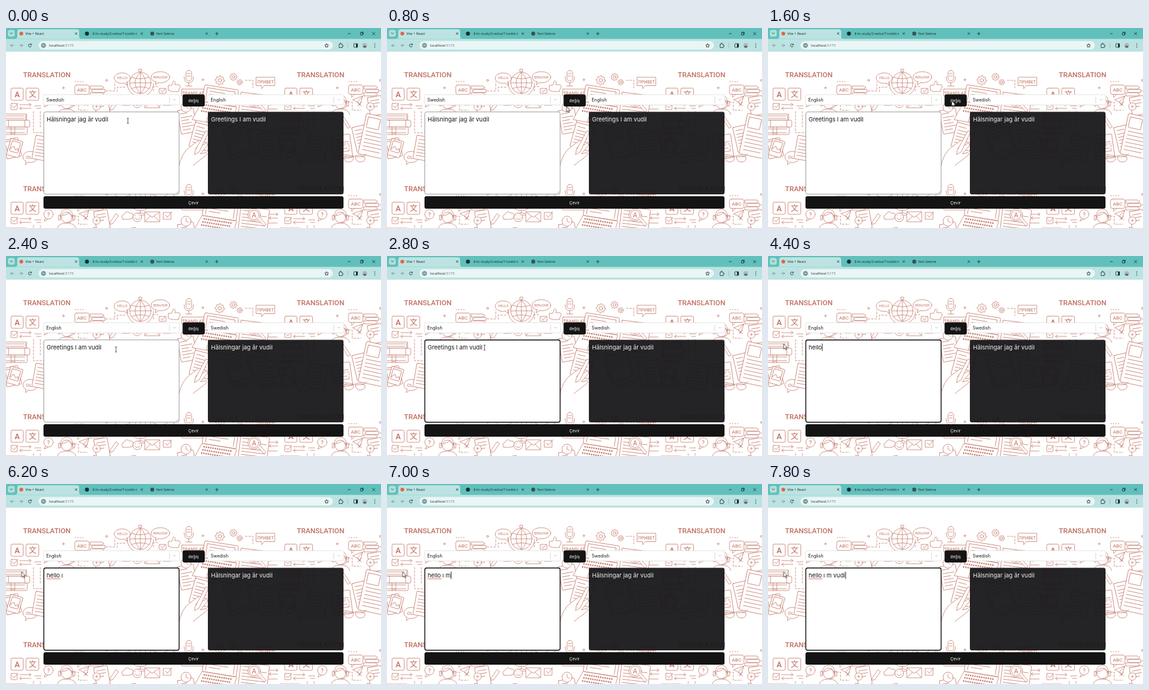
An HTML page that plays this animation: 600 by 321 pixels, repeating every 8000 ms.

```html
<!DOCTYPE html>
<html lang="en">
<head>
<meta charset="utf-8">
<title>Translator</title>
<style>
  html, body { margin: 0; width: 100%; height: 100%; overflow: hidden; background: #fff; }
  svg { display: block; width: 100vw; height: 100vh; }
  text { white-space: pre; }
  .bar { font: 5.5px "Open Sans", sans-serif; fill: #142a2a; }
  .ui { font-family: Inter, sans-serif; font-size: 7.1px; fill: #161616; }
  .ui.big { font-size: 9.4px; }
  .ui.light { fill: #f2f2f2; }
  .line { fill: none; stroke: #1f3837; stroke-width: .85; }
  .art { fill: #fff; stroke: #c67e6f; stroke-width: .8; stroke-linejoin: round; stroke-linecap: round; }
  .art text { font-family: Roboto, "Noto Sans CJK SC", "Noto Sans CJK", sans-serif; fill: #c06f60; stroke: none; text-anchor: middle; }
  .art .open { fill: none; }
  .art .dash { fill: none; stroke-dasharray: 3 2.5; }
  .art .keys { fill: none; stroke-width: 2.4; stroke-dasharray: 2.2 1.4; stroke-linecap: butt; }
</style>
</head>
<body>
<svg viewBox="0 0 600 321" preserveAspectRatio="none">
  <defs>
    <clipPath id="cell"><rect y="38" width="438" height="183"/></clipPath>
    <g id="tile" class="art" clip-path="url(#cell)"></g>
  </defs>
  <rect width="600" height="321" fill="#fff"/>
  <use href="#tile"/>
  <use href="#tile" x="438"/>
  <use href="#tile" y="183"/>
  <use href="#tile" x="438" y="183"/>

  <g id="browser">
    <rect width="600" height="20" fill="#61c0bc"/>
    <rect y="17.5" width="600" height="20.5" fill="#bce3e2"/>
    <path d="M14 17.500q4 0 4-4V6q0-4 4-4h91q4 0 4 4v7.500q0 4 4 4z" fill="#bce3e2"/>
    <rect x="3" y="3" width="11" height="11" rx="3.500" fill="#b0deDB"/>
    <path class="line" d="M6.500 7.500l2 2 2-2"/>
    <circle cx="24.500" cy="9" r="3" fill="#e0663f"/>
    <circle cx="129.500" cy="9" r="3.200" fill="#17302f"/>
    <circle cx="234" cy="9" r="3.200" fill="#3a5453"/>
    <g class="bar">
      <text x="31" y="11">Vite + React</text>
      <text x="138.500" y="11" font-size="5.200" style="font-size:5.2px">8-hc-study/2-redux/7-toolkit-t</text>
      <text x="240" y="11">Yeni Sekme</text>
    </g>
    <path class="line" d="M110.500 7.200l3.500 3.500m0-3.500l-3.500 3.500M215.500 7.200l3.500 3.500m0-3.500l-3.500 3.500M319.500 7.200l3.500 3.500m0-3.500l-3.500 3.500M334.500 9h5.500m-2.750-2.750v5.500M547 9h4.500M586 6.800l4.500 4.500m0-4.500l-4.500 4.500M567 7.800h3.500v3.500h-3.500zM568 7.800v-1.200h3.700v3.700h-1.200"/>
    <rect x="52" y="21" width="471" height="13.500" rx="6.750" fill="#eaf6f5"/>
    <circle cx="60" cy="28" r="5" fill="#c9e4e2"/>
    <path class="line" d="M40.500 27a2.400 2.400 0 1 0 0 2m.2-3.800v1.900h-1.900M60 27.500v2m0-4v1"/>
    <circle class="line" cx="60" cy="28" r="2.800"/>
    <path class="line" opacity=".5" d="M12.500 28h-5m2.300-2.300L7.500 28l2.300 2.300M21.500 28h5m-2.300-2.300l2.300 2.300-2.300 2.300"/>
    <text class="bar" x="69" y="30" style="font-size:5.8px">localhost<tspan fill="#5f6f6e">:5173</tspan></text>
    <path class="line" d="M513 25l.9 2 2.200.2-1.600 1.500.4 2.200-1.900-1.100-1.900 1.100.4-2.200-1.600-1.500 2.200-.2zM533 26h1.500q-.3-2 .8-2t.8 2h1.900v1.800q1.600 0 1.600 1t-1.600 1V31.500h-5z"/>
    <path d="M547 24v8" stroke="#86bdb9" stroke-width=".7"/>
    <rect class="line" x="556.500" y="25.200" width="6" height="5.800" rx=".8"/>
    <path d="M560 25.200h2.500V31H560z" fill="#142a2a"/>
    <circle cx="574" cy="28" r="3.700" fill="#a9b6c2"/>
    <path d="M571 30q3-3 6 0q-3 3-6 0z" fill="#5b565c"/>
    <path d="M590 25.300v.1m0 2.600v.1m0 2.600v.1" stroke="#142a2a" stroke-width="1.300" stroke-linecap="round"/>
  </g>

  <g id="selects"></g>
  <g fill="#141415">
    <rect x="282.500" y="106.500" width="35.500" height="19.500" rx="3"/>
    <rect x="60" y="270" width="480" height="20" rx="3"/>
  </g>
  <text class="ui light" x="300" y="118.500" text-anchor="middle" style="font-size:6.7px">değiş</text>
  <text class="ui light" x="300" y="282.800" text-anchor="middle" style="font-size:6.7px">Çevir</text>

  <rect id="field" x="60.500" y="134.700" width="216.500" height="132" rx="3" fill="#fff"/>
  <path id="grip" d="M276 261.500l-4 4m4-2l-2 2" stroke="#888" stroke-width=".6"/>
  <rect x="323" y="134.500" width="217" height="132.500" rx="3" fill="#19181a" opacity=".95"/>
  <rect id="mark" y="140" height="13" fill="#2f62cf"/>
  <text id="input" class="ui big" x="65" y="149.500"></text>
  <text id="output" class="ui big light" x="328" y="149.500"></text>
  <path id="squiggle" fill="none" stroke="#e0473f" stroke-width=".7"/>
  <rect id="caret" y="140.500" width=".9" height="12" fill="#111"/>
  <path id="arrow" d="M0 0v8.500l2-1.800 1.500 3.200 1.300-.6-1.500-3.100h2.700z" fill="#fff" stroke="#222" stroke-width=".7"/>
  <path id="beam" d="M-1.500-4H1.500M0-4V4M-1.500 4H1.500" fill="none" stroke="#333" stroke-width=".8"/>
</svg>
<script>
const $ = id => document.getElementById(id);

// Background illustration helpers
const path = (d, cls = 'open') => `<path class="${cls}" d="${d}"/>`;
const word = (x, y, size, s, weight = 400) =>
  `<text x="${x}" y="${y}" font-size="${size}" font-weight="${weight}">${s}</text>`;
const box = (x, y, w, h, r = 2) => `<rect x="${x}" y="${y}" width="${w}" height="${h}" rx="${r}"/>`;
const disc = (x, y, r, extra = '') => `<circle cx="${x}" cy="${y}" r="${r}" ${extra}/>`;
const tilt = (x, y, angle, art) => `<g transform="translate(${x} ${y}) rotate(${angle})">${art}</g>`;
const bubble = (x, y, rx, ry, s, size, side = 1) =>
  `<ellipse cx="${x}" cy="${y}" rx="${rx}" ry="${ry}"/>` +
  path(`M${x + 3 * side} ${y + ry - .6}l${5 * side} 4 ${-side}-6`, '') + word(x, y + size * .36, size, s);
const sheet = (x, y, w, h, angle, gap = 5) => {
  let rows = '';
  for (let v = 12; v < h - 4; v += gap) rows += `M4 ${v}h${w - 8 - (v % 3) * 3}`;
  return tilt(x, y, angle, box(0, 0, w, h, 1) + path(`M4 6h${w * .4}` + rows));
};
const gear = (x, y, r) => {
  const rim = Array.from({ length: 32 }, (_, i) => {
    const a = i * Math.PI / 16, d = i % 4 < 2 ? r : r * .76;
    return `${(x + d * Math.cos(a)).toFixed(1)} ${(y + d * Math.sin(a)).toFixed(1)}`;
  });
  return path(`M${rim.join('L')}z`, '') + disc(x, y, r * .38);
};
const swap = (x, y, w) => path(`M${x} ${y}h${w}m-3-2.500l3 2.500-3 2.500M${x + w} ${y + 6}h${-w}m3-2.500l-3 2.500 3 2.500`);
const plus = (x, y) => path(`M${x - 2} ${y}h4m-2-2v4`);
const dots = (x, y) => `<path d="M${x} ${y}h13" stroke-width="1.6" stroke-dasharray="0 4"/>`;

$('tile').innerHTML = [
  word(65.300, 78.6, 11.4, 'TRANSLATION', 500),
  box(8, 96.500, 19.5, 19.5), word(18, 110.500, 12.5, 'A', 500),
  box(32, 96.500, 20.5, 19.5), word(42.500, 110.700, 12.5, '文'),
  box(8, 121, 10, 10, 1), path('M10 125l3 3 6-7'),
  swap(22, 123, 18), path('M46 125h10m-7 4h7'), path('M44 134v34h18M55 134v26', 'dash'),
  // phrase cards
  dots(111, 86), dots(331, 100),
  box(110, 91.500, 23, 15, 3), path('M115 106.500v5l5-5'), word(121.500, 102, 8, 'ABC'),
  path('M135 93h18l4 2.500-4 2.500h-18zM158 98.500h-18l-4 2.500 4 2.500h18zM135 104h18l4 2.500-4 2.500h-18z', ''),
  path('M160 101h14v-14', 'dash'), disc(161, 84, 1.500), plus(92, 96), plus(315, 83),
  // globe
  disc(215, 89, 21, 'class="open" stroke-dasharray="72 60"'),
  disc(215, 88, 17),
  path('M215 71v34M198 88h34M201 79q14 5 28 0M201 97q14-5 28 0M215 71q-17 17 0 34M215 71q17 17 0 34M213 66h4v4h-4zM215 110v4M205 117q10-7 20 0z'),
  bubble(186, 80.500, 13, 8.5, 'HELLO', 5.4), bubble(247, 79, 15, 9, 'BONJOUR', 5, -1),
  path('M260 92h5l3-7q4 0 2 6h7q3 2 1 5t-2 6h-11l-5-2z', ''),
  box(245, 97, 11, 8, 1), path('M248 100l2 3 5-6'),
  path('M178 102v-7h15M236 101v-7h8', 'dash'),
  // microphone
  '<rect x="288" y="68" width="9" height="17" rx="4.500"/>',
  path('M285 78q0 10 7.500 10t7.500-10M292.500 88v5m-5 0h10M290 73h5m-5 4h5'),
  box(281, 98, 41, 11, 1), word(301.500, 106.700, 7.2, 'TRANSLATE'),
  gear(342, 84, 7.500), gear(364, 78.500, 5.800), gear(374, 87, 4.500),
  path('M383 84h12v12', 'dash'),
  path('M400.500 79h29.500v13.500h-17l-4 5v-5h-8.500z', ''), word(415.300, 88.500, 6.9, 'ПРИВЕТ'),
  // desk rows
  disc(68, 116, 7.500), path('M63 122l-2 5 6-3'), word(68, 119.500, 9, '?'),
  path('M82 139q2-9 15-9t15 9', ''), disc(97, 121, 8.500), path('M87 121q0-13 10-13t10 13M87 118v7h-3v-7zM107 118v7h3v-7zM107 125q-2 5-9 4M90 118q8-1 10-5q2 4 6 5'),
  path('M117 115l16-6-5 15-4-5zM124 119l9-10', ''),
  tilt(140, 112, -10, box(0, 0, 22, 30, 1) + path('M4 6h14M4 11h14M4 16h10')),
  path('M167 128l9-13 4 3-9 13-5 1zM187 124q-4-6 2-8q3-7 9-2q7-1 5 7q0 4-16 3z', ''),
  disc(210, 121, 7), path('M206 122q4 5 8 0M207 118v.5m6-.5v.5'),
  box(222, 112, 24, 16, 1), path('M222 112l12 9 12-9M222 128l9-9m15 9l-9-9'),
  path('M252 113h12v11h-12zM255 117l3 4 7-9', ''),
  // laptop, papers, hand and pen
  sheet(376, 103, 46, 56, 7), sheet(274, 133, 26, 38, -10),
  tilt(318, 91, 9, box(0, 0, 55, 27) + path('M5 4h45v20M5 4v20M10 9h24m-24 5h30m-30 5h18')),
  path('M314 118l55 9-9 32-62-12z', ''),
  path('M316 123l46 7.500M314 128l46 7.500M312 133l46 7.500', 'keys'),
  path('M323 143l17 3-2 7-17-3z', ''),
  disc(288, 127, 8), path('M288 122v5l4 2'),
  sheet(303, 151, 31, 40, 15),
  path('M276 224q5-24 18-33l15-11q4 0 2 5l-8 9 17-9q4 1 2 4l-11 13 9-2q3 3-2 6l-18 14-4 8z', ''),
  path('M303 196l17-31 4 2-15 32-7 4z', ''),
  disc(397, 117, 10), disc(397, 117, 7.500), word(397, 121, 10.5, 'A'), path('M403 124l10 11 3-3-10-11', ''),
  swap(421, 116, 14), path('M420 130h14'),
  tilt(346, 163, -17, box(0, 0, 40, 50, 3) + box(4, 5, 32, 38, 1) + path('M8 11h22m-22 6h18m-18 6h22')),
  sheet(401, 171, 33, 42, -9),
  path('M375 207l28-12 2 4-29 12-4-1z', ''),
  // books, photos
  box(-4, 138, 37, 10), box(-4, 148, 42, 11), box(-4, 159, 38, 12),
  path('M0 141h29M0 145h29M4 148v11m26-11v11M0 162h30M0 168h30M8 159v12l3-3 3 3v-12M33 138q-4 5 0 10'),
  tilt(-5, 181, -13, box(0, 0, 24, 30, 1) + box(3, 3, 18, 19, 1)),
  tilt(8, 177, 16, box(0, 0, 20, 27, 1) + box(3, 3, 14, 17, 1) + path('M3 17l5-6 4 5 3-3 2 4')),
  bubble(39, 207, 12, 9, 'OLA', 7.3, -1),
  sheet(48, 172, 30, 38, 10), sheet(82, 174, 30, 38, -8),
  // right-hand desk
  path('M104 119h12v13h14', 'dash'), path('M125 119l6 6m0-6l-6 6'), disc(145, 126, 6), plus(145, 126),
  sheet(115, 160, 28, 41, -13),
  tilt(139, 137, 12, box(0, 0, 54, 66, 2) + box(4, 5, 20, 17, 1) + path('M28 7h20m-20 5h22m-22 5h18M5 28h44M5 34h40M5 40h44M5 46h37M5 52h44M5 58h28')),
  path('M103 207q3-4 8-3l8 2q8-4 14 0l6-4M103 207q0 9 8 8t7-8zM121 207q1 9 9 8t6-8z'),
  path('M102 142l11 17-4 2-10-17z', ''), path('M102 186h9v10', 'dash'),
  sheet(166, 143, 42, 51, -8), sheet(220, 147, 38, 52, 7)
].join('');

const dropdown = (x, id) =>
  `<rect x="${x}" y="107" width="217.500" height="16.500" rx="2" fill="#fff" stroke="#d8d8d8" stroke-width=".7"/>
   <text id="${id}" class="ui" x="${x + 4.500}" y="117.800"></text>
   <path d="M${x + 201.500} 110v10.500" stroke="#ccc" stroke-width=".7"/>
   <path d="M${x + 207.500} 114l2 2 2-2" fill="none" stroke="#bbb" stroke-width=".9"/>`;
$('selects').innerHTML = dropdown(60, 'from') + dropdown(323, 'to');
$('squiggle').setAttribute('d', 'M65 152.800' + 'l1-1.300 1 1.300'.repeat(11));

// Each entry changes the state from that step on; a step lasts 200 ms.
const STEP = 200, STEPS = 40;
const swedish = 'Hälsningar jag är vudil', english = 'Greetings I am vudil';
const at = (x, y, shape) => ({ x, y, shape });
const changes = {
  0: { from: 'Swedish', to: 'English', input: swedish, output: english, ...at(195, 149, 'beam') },
  1: at(203, 147, 'beam'), 2: at(247, 140, 'beam'), 3: at(283, 128, 'arrow'), 4: at(287, 126, 'arrow'),
  5: at(292, 119, 'arrow'), 6: at(294, 117, 'arrow'),
  7: { from: 'English', to: 'Swedish', input: english, output: swedish },
  9: at(288, 126, 'arrow'), 10: at(243, 142, 'beam'), 11: at(195, 150, 'beam'), 12: at(176, 150, 'beam'),
  13: at(166, 149, 'beam'), 14: { ...at(156, 147, 'beam'), focus: true },
  15: { ...at(143, 147, 'beam'), select: true }, 16: at(105, 146, 'beam'), 17: at(58, 143, 'arrow'), 18: at(25, 141, 'arrow'),
  19: { input: 'h', select: false, caret: true }, 20: { input: 'he' }, 21: { input: 'hell' }, 22: { input: 'hello' },
  24: { caret: false }, 26: { caret: true }, 28: { input: 'hello ', checked: true },
  29: { input: 'hello ı' }, 31: { caret: false }, 33: { input: 'hello ı ', caret: true },
  34: { input: 'hello ı m' }, 36: { input: 'hello ı m ' },
  37: { input: 'hello ı m v' }, 38: { input: 'hello ı m vu' }, 39: { input: 'hello ı m vudi' }
};
const states = [];
for (let i = 0; i < STEPS; i++) states.push({ ...states[i - 1], ...changes[i] });

const show = (id, on) => $(id).setAttribute('visibility', on ? 'visible' : 'hidden');

function draw(s) {
  for (const id of ['from', 'to', 'input', 'output']) $(id).textContent = s[id];
  const end = 65 + $('input').getComputedTextLength();
  const start = Math.max(65, Math.min(end, s.x));
  $('field').setAttribute('stroke', s.focus ? '#101010' : '#858585');
  $('field').setAttribute('stroke-width', s.focus ? 1.4 : .8);
  show('grip', !s.focus);
  show('mark', s.select);
  $('mark').setAttribute('x', start);
  $('mark').setAttribute('width', end - start);
  $('input').style.fill = s.select && start < 90 ? '#fff' : '';
  show('caret', s.caret);
  $('caret').setAttribute('x', end + .3);
  show('squiggle', s.checked);
  for (const id of ['arrow', 'beam']) show(id, s.shape === id);
  $(s.shape).setAttribute('transform', `translate(${s.x} ${s.y})`);
}

const began = performance.now();
let shown = -1;
function tick() {
  const step = Math.floor((performance.now() - began) / STEP) % STEPS;
  if (step !== shown) draw(states[shown = step]);
  requestAnimationFrame(tick);
}
tick();
</script>
</body>
</html>
```
